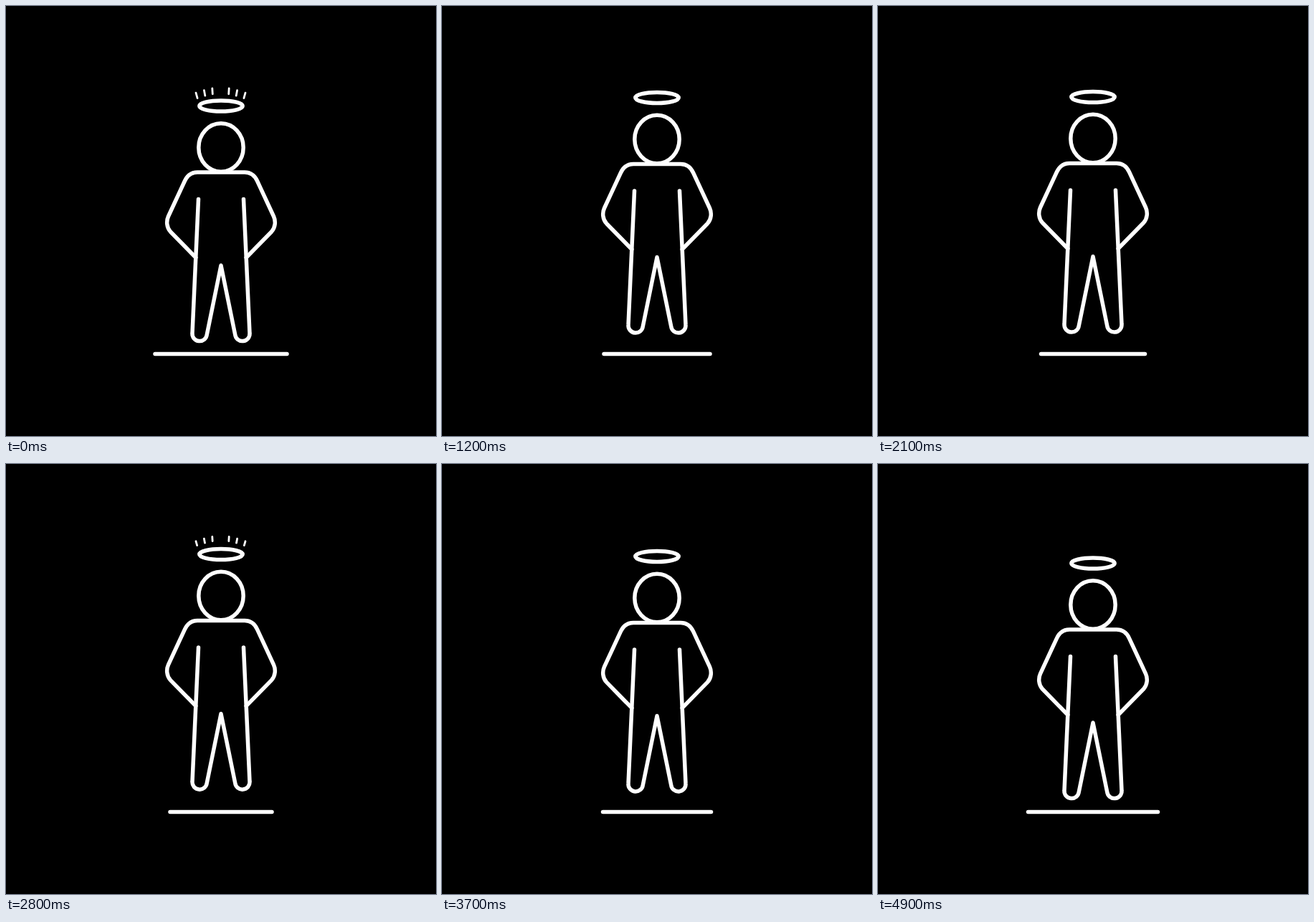
Recreate the animation shown at these times as an HTML page. Size 600 px wide and 600 px high, loop 5000 ms.

```html
<!DOCTYPE html>
<html lang="en">
<head>
<meta charset="utf-8">
<title>Floating figure</title>
<style>
  html, body { margin: 0; height: 100%; overflow: hidden; background: #000; }
  svg { display: block; width: 100%; height: 100%; }
  svg * { fill: none; stroke: #fff; stroke-width: 5.5; stroke-linecap: round; stroke-linejoin: round; }
  #rays { stroke-width: 2.8; }
</style>
</head>
<body>
<svg viewBox="0 0 600 600">
  <g id="figure">
    <path id="rays"/>
    <ellipse cx="300" cy="139.5" rx="30.2" ry="7.5"/>
    <ellipse cx="300" cy="197.5" rx="31.2" ry="33.7"/>
    <path d="M264.8 351 L229.5 315 C224 309 223.5 300 226.5 293.5 L249.5 244 C253 236.500 259 232 267 232
             H333 C341 232 347 236.500 350.500 244 L373.500 293.500 C376.500 300 376 309 370.500 315 L335.200 351"/>
    <path d="M268.500 269.500 L260 456.500 A10.200 10.200 0 0 0 280.300 458.500 L300 362
             L319.700 458.500 A10.200 10.200 0 0 0 340 456.500 L331.500 269.500"/>
  </g>
  <path id="ground"/>
</svg>
<script>
const LOOP = 5000, STEP = 100, LEAD = 100 / 3;
const RISE = 2500 / 3;              // time from lowest to highest point
const PULSE = 4000 / 3;             // time between two flashes of the rays
const SHRINK = PULSE / 2;           // time a ray takes to vanish
const AXIS = 299.5;

// Left rays: outer end x, y and inner end x, y; the right ones are mirrored.
const RAYS = [
  [265, 121.2, 267.2, 129],
  [276.4, 117.6, 277.9, 125.6],
  [287.8, 114.9, 288.3, 123.2]
];

const el = id => document.getElementById(id);
const figure = el('figure'), rays = el('rays'), ground = el('ground');

function rayPath(left) {
  if (left <= 0) return '';
  return RAYS.map(([x, y, ix, iy]) => {
    const ex = x + (ix - x) * left, ey = y + (iy - y) * left;
    return `M${x} ${y}L${ex} ${ey}M${2 * AXIS - x} ${y}L${2 * AXIS - ex} ${ey}`;
  }).join('');
}

function draw(now) {
  const t = Math.floor((now % LOOP) / STEP) * STEP + LEAD;
  const lift = 1 - Math.abs(1 - (t / RISE) % 2);
  const half = 93.5 - 37.5 * lift;
  const age = (t + 0.01) % PULSE;

  figure.setAttribute('transform', `translate(0 ${0.96 - 24 * lift})`);
  ground.setAttribute('d', `M${300 - half} 485.5H${300 + half}`);
  rays.setAttribute('d', rayPath(1 - age / SHRINK));
  requestAnimationFrame(draw);
}
draw(0);
</script>
</body>
</html>
```
